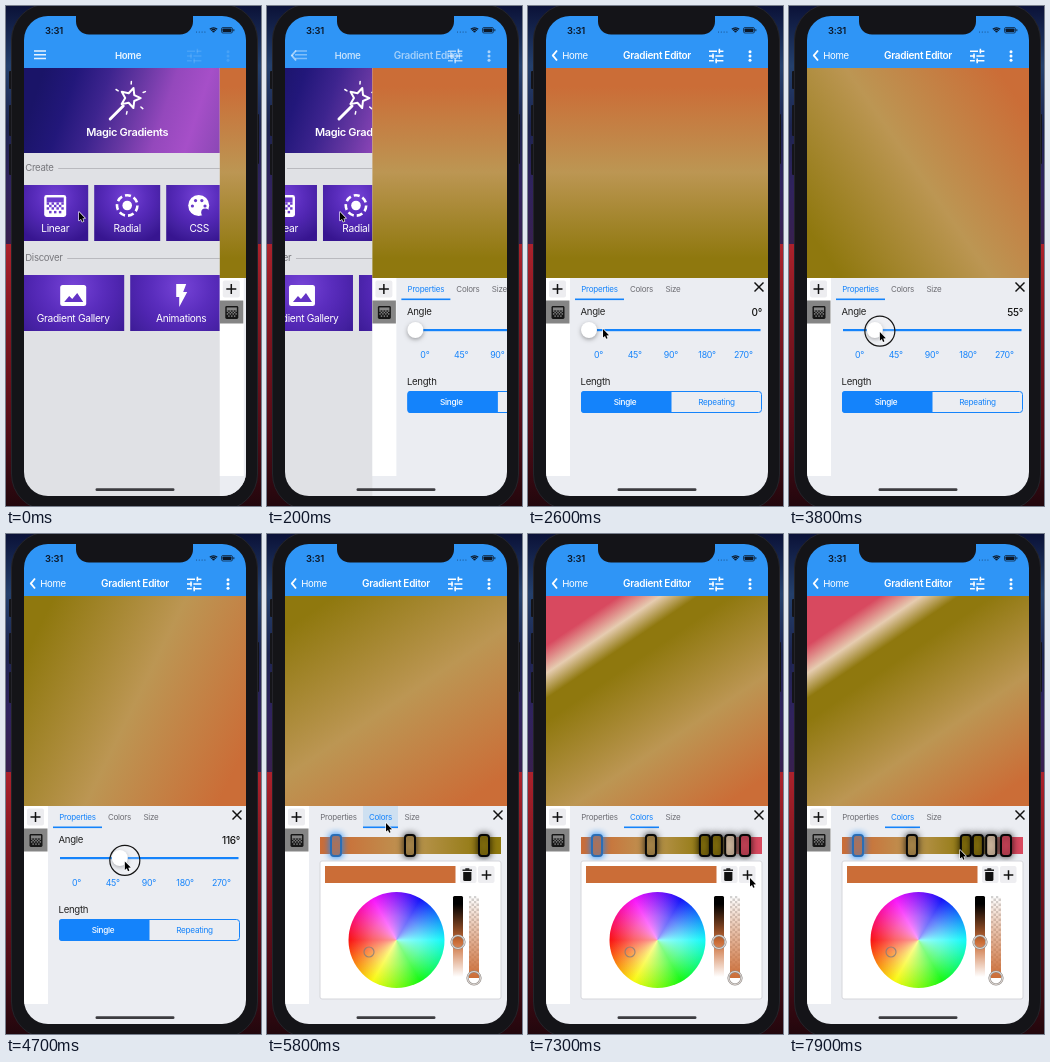
Recreate the animation shown at these times as an HTML page with a canvas. Size 255 by 500 pixels, loop 8 s.

```html
<!DOCTYPE html>
<html lang="en">
<head>
<meta charset="utf-8">
<title>Gradient editor</title>
<style>
html, body { margin: 0; width: 100%; height: 100%; overflow: hidden; background: #000; }
canvas { display: block; width: 255px; height: 500px; }
</style>
</head>
<body>
<canvas id="stage"></canvas>
<script>
const LOOP = 8000, STEP = 100;
const W = 255, H = 500;
const LEFT = 18, SCREEN_W = 222, TRACK = 53, TRACK_W = 181;
const BLUE = '#1483fb', BAR = '#2f95f6', INK = '#111', CASE = '#141418';
const ORANGE = '#cb6d37', TAN = '#bc9653', OLIVE = '#8f780e', PALE = '#e6ccb0', PINK = '#d8495f';
const DRAG = [3000, 5140], TAB_AT = 5700, FIRST_ADD = 6800, ADD_GAP = 200;

const canvas = document.getElementById('stage');
const c = canvas.getContext('2d');
const dpr = window.devicePixelRatio || 1;
canvas.width = W * dpr;
canvas.height = H * dpr;

const clamp = (v, a = 0, b = 1) => Math.min(b, Math.max(a, v));
const smooth = u => u * u * (3 - 2 * u);
const steady = u => u;
const mix = (a, b, u) => a + (b - a) * u;
const times = (n, f) => Array.from({ length: n }, (_, i) => f(i));

// pointer moves: start, end, x, y, easing
const moves = [
  [300, 900, 83, 321, smooth],
  [1500, 2300, 75, 323, smooth],
  [2600, 2900, 66, 325, smooth],
  [...DRAG, 132.5, 328, steady],
  [5250, 5600, 119, 289, smooth],
  [5900, 6500, 222, 344, smooth],
  [7300, 7800, 171, 316, smooth]
];

function pointer(t) {
  let x = 73, y = 206;
  for (const [from, to, tx, ty, ease] of moves) {
    const u = ease(clamp((t - from) / (to - from)));
    x = mix(x, tx, u);
    y = mix(y, ty, u);
  }
  return [x, y];
}

const added = t => clamp(Math.floor((t - FIRST_ADD) / ADD_GAP) + 1, 0, 3);

function pressed(t) {
  const click = at => t >= at - 100 && t < at + 50;
  return (t >= DRAG[0] - 100 && t < DRAG[1]) || click(TAB_AT - 50)
    || [0, 1, 2].some(i => click(FIRST_ADD + i * ADD_GAP - 50));
}

function paint(fill, stroke, width = 1) {
  if (fill) { c.fillStyle = fill; c.fill(); }
  if (stroke) { c.strokeStyle = stroke; c.lineWidth = width; c.stroke(); }
}

function rect(x, y, w, h, fill) {
  c.fillStyle = fill;
  c.fillRect(x, y, w, h);
}

function round(x, y, w, h, r, ...style) {
  c.beginPath();
  c.roundRect(x, y, w, h, r);
  paint(...style);
}

function disc(x, y, r, ...style) {
  c.beginPath();
  c.arc(x, y, r, 0, Math.PI * 2);
  paint(...style);
}

function poly(points, ...style) {
  c.beginPath();
  points.forEach(p => c.lineTo(...p));
  c.closePath();
  paint(...style);
}

function line(x0, y0, x1, y1, color, width) {
  c.beginPath();
  c.moveTo(x0, y0);
  c.lineTo(x1, y1);
  paint(null, color, width);
}

function shadowed(color, blur, dy, draw) {
  c.save();
  c.shadowColor = color;
  c.shadowBlur = blur * dpr;
  c.shadowOffsetY = dy * dpr;
  draw();
  c.restore();
}

function text(s, x, y, size, color, align = 'left', weight = 400) {
  c.font = `${weight} ${size}px Inter, "Liberation Sans", sans-serif`;
  c.letterSpacing = `${-0.03 * size}px`;
  c.textAlign = align;
  c.fillStyle = color;
  c.fillText(s, x, y + size * 0.36);
}

function blend(g, stops) {
  stops.forEach(([o, col]) => g.addColorStop(clamp(o), col));
  return g;
}
const even = (...cols) => cols.map((col, i) => [i / (cols.length - 1), col]);
const linear = (x0, y0, x1, y1, stops) => blend(c.createLinearGradient(x0, y0, x1, y1), stops);
const radial = (x, y, r, stops) => blend(c.createRadialGradient(x, y, 0, x, y, r), stops);

function plus(x, y, r) {
  line(x - r, y, x + r, y, INK, 1.5);
  line(x, y - r, x, y + r, INK, 1.5);
}

// Colour stops as [position, colour]; each addition squeezes the earlier ones.
function stopsFor(count) {
  let list = even(ORANGE, TAN, OLIVE);
  for (const col of [OLIVE, PALE, PINK].slice(0, count))
    list = [...list.map(([p, k]) => [p * 0.9, k]), [1, col]];
  return list;
}
const thumbX = p => 69 + 148 * p;
const onTrack = (stops, scale = 1) => stops.map(([p, col]) => [(thumbX(p) - TRACK) / TRACK_W * scale, col]);

function backdrop() {
  rect(0, 0, W, H, linear(0, 0, 0, 240, even('#0b1238', '#24406c', '#1d2550', '#30235e', '#38204e')));
  rect(0, 238, W, H, linear(0, 238, 0, H, even('#ac222c', '#8a1822', '#6c111c', '#4c0b16', '#22070d')));
  for (const y of [65, 99, 138]) round(3, y, 4, y < 90 ? 18 : 31, 1, CASE);
  round(249, 108, 4, 50, 1, CASE);
  round(5.5, -2, 246, 506, 36, CASE, '#24242a');
}

// Framed square whose lower half breaks into a checker.
function ditherIcon(x, y, s, fg, bg) {
  const n = s / 9;
  round(x, y, s, s, n, fg);
  rect(x + n, y + n, 7 * n, 2 * n, bg);
  for (let r = 2; r < 5; r++)
    for (let k = r % 2; k < 7; k += 2) rect(x + (k + 1) * n, y + (r + 1) * n, n, n, bg);
  for (let k = 2; k < 8; k += 2) rect(x + k * n, y + 6.5 * n, n, n, bg);
}

function card(x, y, w, label) {
  const cx = x + w / 2;
  rect(x, y, w, 56, radial(cx, y + 12, w * 0.72, even('#7644d6', '#6838ca', '#5a2dbd', '#4f25b0', '#43209f', '#371590')));
  text(label, cx, y + 43.5, 10.2, '#fff', 'center');
}

function wand(x, y) {
  const at = (r, a) => [x + r * Math.cos(a), y + r * Math.sin(a)];
  c.save();
  c.lineCap = c.lineJoin = 'round';
  poly(times(10, i => at(i % 2 ? 5 : 10.5, i * Math.PI / 5 - 1.25)), null, '#fff', 2);
  line(x - 7, y + 8, x - 20, y + 21, '#fff', 3);
  times(5, i => line(...at(14, i * 1.1 - 2.6), ...at(16.5, i * 1.1 - 2.6), '#fff', 1.5));
  c.restore();
}

function heading(s, y, lineX) {
  text(s, 27, y, 9.6, '#77777c');
  rect(lineX, y, 234 - lineX, 1, '#b9b9be');
}

function home(shift) {
  c.save();
  c.translate(-shift, 0);
  rect(0, 62, 260, 440, '#e0e1e5');
  rect(18, 62, 240, 85, linear(40, 80, 222, 140,
    even('#1a1468', '#22177a', '#3d248e', '#6637a2', '#9448bc', '#a64fc8', '#8c48b6')));
  wand(132, 92);
  text('Magic Gradients', 129, 126.5, 11, '#fff', 'center', 600);
  heading('Create', 162, 60);
  heading('Discover', 252, 69);
  ['Linear', 'Radial', 'CSS'].forEach((s, i) => card(24 + 72 * i, 179, 66, s));
  ['Gradient Gallery', 'Animations'].forEach((s, i) => card(24 + 108 * i, 269, 102, s));

  ditherIcon(46, 189, 22, '#fff', '#6c3bcd');
  c.setLineDash([6, 3.1]);
  disc(129, 199.5, 10.2, null, '#fff', 2.6);
  c.setLineDash([]);
  disc(129, 199.5, 4.8, '#fff');
  disc(200.5, 199.5, 10.5, '#fff');
  disc(207, 206.5, 4, '#5a2dbd');
  times(4, i => disc(200.5 - 6.3 * Math.cos(i * Math.PI / 3), 200 - 6.3 * Math.sin(i * Math.PI / 3), 1.6, '#6838ca'));
  round(62, 279, 26, 21, 2.5, '#fff');
  poly([[66, 296], [71, 290], [74, 293], [79, 287], [85, 296]], '#6434c6');
  poly([[178, 278], [188, 278], [185, 286], [189, 286], [181, 301], [181, 291], [178, 291]], '#fff');
  c.restore();
}

function preview(count, angle) {
  const a = angle * Math.PI / 180, sx = -Math.sin(a), sy = Math.cos(a);
  const half = (SCREEN_W * Math.abs(sx) + 210 * Math.abs(sy)) / 2, cx = 129, cy = 167;
  const stops = onTrack(stopsFor(count), 1 - 0.016 * count);
  rect(LEFT, 62, SCREEN_W, 210, linear(cx - sx * half, cy - sy * half, cx + sx * half, cy + sy * half, stops));
}

function tabs(active, t) {
  const [x, w] = active ? [96, 35] : [47, 49];
  if (active) rect(x, 272, w, 21, `rgba(120,185,235,${0.25 * clamp(1 - (t - 5800) / 400)})`);
  ['Properties', 'Colors', 'Size'].forEach((s, i) =>
    text(s, [71.5, 113.5, 145][i], 283, 8, i === active ? BLUE : '#6d6d73', 'center'));
  rect(x, 292.5, w, 1.6, BLUE);
  for (const d of [-4.5, 4.5]) line(231 - d, 276.5, 231 + d, 285.5, INK, 1.5);
}

function properties(angle, x) {
  text('Angle', 52.5, 306, 9.6, '#222');
  text(angle + '°', 234, 306, 10, INK, 'right', 500);
  rect(54, 323, 178.5, 2.2, BLUE);
  shadowed('rgba(0,0,0,.35)', 4, 1.5, () => disc(x, 324, 8, '#fff'));
  [0, 45, 90, 180, 270].forEach((v, i) => text(v + '°', 70.5 + 36.2 * i, 349, 8.8, BLUE, 'center'));
  text('Length', 52.5, 375.5, 9.6, '#222');
  round(TRACK, 385, 90.5, 22, [3, 0, 0, 3], BLUE);
  round(TRACK + 0.5, 385.5, TRACK_W - 1, 21, 3, null, BLUE);
  text('Single', 97, 396, 8.2, '#fff', 'center', 500);
  text('Repeating', 188.5, 396, 8.2, BLUE, 'center');
}

function wheel(x, y, r) {
  const hues = c.createConicGradient(Math.PI, x, y);
  disc(x, y, r, blend(hues, even(...times(7, i => `hsl(${360 - i * 60},95%,52%)`))));
  disc(x, y, r, radial(x, y, r, even('rgba(255,255,255,.6)', 'rgba(255,255,255,.35)', 'rgba(255,255,255,0)')));
  disc(102, 418, 5, null, 'rgba(130,125,125,.8)', 1.2);
}

function knob(x, y) {
  disc(x, y, 6.5, null, '#8c8784', 2.2);
  disc(x, y, 6.5, null, '#ddd6d2', 1.1);
}

function colors(stops) {
  rect(TRACK, 303, TRACK_W, 17, linear(TRACK, 0, TRACK + TRACK_W, 0, onTrack(stops)));
  stops.forEach(([p, col], i) => {
    const x = thumbX(p);
    shadowed(i ? 'rgba(0,0,0,.75)' : '#1689ff', 7, 0,
      () => round(x - 5, 301, 10, 21, 3, col, i ? '#080808' : '#2b6db4', 2));
  });
  round(TRACK, 327, TRACK_W, 138, 2, '#fff', '#d5d6db');
  rect(58, 332, 130.5, 17, ORANGE);
  for (const x of [193, 211]) round(x, 332, 16.5, 17, 2, '#eeeef1');
  rect(195.5, 335.5, 9.5, 1.4, INK);
  rect(198.3, 334.3, 4, 1.5, INK);
  round(196.2, 338, 8.2, 9, [0, 0, 1.5, 1.5], INK);
  plus(219.5, 341, 4.8);
  wheel(129.5, 406, 48);
  round(186, 362, 10, 81, 1.5, linear(0, 362, 0, 443, [[0.1, '#000'], [0.57, ORANGE], [1, '#fff']]));
  for (let i = 0; i < 128; i++) {
    const x = i % 4, y = i >> 2;
    rect(202 + x * 2.5, 362 + y * 2.5, 2.5, 2.5, (x + y) % 2 ? '#fff' : '#d2d2d2');
  }
  rect(202, 362, 10, 82, linear(0, 362, 0, 444, even('rgba(203,109,55,0)', ORANGE)));
  knob(191, 408);
  knob(207, 444);
}

function editor(t, offset) {
  const count = added(t);
  const drag = pointer(clamp(t, ...DRAG))[0] - 5;
  const angle = Math.round((drag - 61) / 164 * 360);
  const tab = t >= TAB_AT ? 1 : 0;
  c.save();
  c.translate(offset, 0);
  rect(LEFT, 62, SCREEN_W, 430, '#ebedf2');
  preview(count, angle);
  rect(18, 272, 24, 198, '#fff');
  round(21, 274.5, 17, 17, 2, '#ededf0');
  plus(29.5, 283, 5);
  rect(18, 294.5, 23.5, 23, '#858585');
  ditherIcon(23.5, 300, 13, '#161616', '#858585');
  tabs(tab, t);
  if (tab) colors(stopsFor(count));
  else properties(angle, drag);
  c.restore();
}

function statusBar() {
  const ink = '#0c1828';
  text('3:31', 48, 24.5, 9.4, ink, 'center', 600);
  times(4, i => disc(190.5 + i * 2.8, 26, 0.6, 'rgba(10,30,60,.65)'));
  for (const r of [5.2, 3.3, 1.4]) {
    c.beginPath();
    c.arc(207.5, 27, r, -2.35, -0.79);
    paint(null, ink, 1.3);
  }
  round(215.5, 21.5, 11, 5.5, 1.5, null, ink, 0.7);
  round(216.5, 22.4, 9, 3.7, 0.8, ink);
  rect(227.4, 23.2, 0.9, 2, ink);
}

// Three slider rows: a gap and a tick in each.
function tuneIcon(x, y) {
  [[10, 13], [6, 5], [6, 9]].forEach(([gap, tick], i) => {
    const s = 0.8, ly = y + (i - 1) * 6 * s;
    line(x, ly, x + gap * s, ly, '#fff', 1.5);
    line(x + (gap + 2) * s, ly, x + 18 * s, ly, '#fff', 1.5);
    line(x + tick * s, ly - 2.4, x + tick * s, ly + 2.4, '#fff', 1.5);
  });
}

function header(p) {
  const slide = clamp((p - 0.12) / 0.88), homeX = mix(122, 47, slide);
  rect(LEFT, 8, SCREEN_W, 54, BAR);
  statusBar();
  c.globalAlpha = 1 - p;
  times(3, i => line(28, 45 + i * 3.7, 40, 45 + i * 3.7, '#fff', 1.5));
  text('Home', homeX, 49.5, 9.6, '#fff', 'center', 600);
  c.globalAlpha = p;
  text('Home', homeX, 49.5, 9.6, '#fff', 'center');
  tuneIcon(181, 50);
  times(3, i => disc(222, 45.8 + i * 4.2, 1.5, '#fff'));
  c.globalAlpha = slide;
  line(29, 44.5, 24.5, 49.8, '#fff', 1.8);
  line(24.5, 49.2, 29, 54.5, '#fff', 1.8);
  text('Gradient Editor', mix(200, 129, slide), 49.5, 10, '#fff', 'center', 600);
  c.globalAlpha = 1;
}

function arrow(t) {
  const [x, y] = pointer(t);
  if (pressed(t)) disc(x, y - 1, 15, 'rgba(255,255,255,.2)', '#151515', 1.2);
  c.save();
  c.translate(x, y);
  c.lineJoin = 'round';
  const shape = [[0, 0], [0, 8.6], [2, 6.9], [3.2, 9.8], [4.6, 9.2], [3.4, 6.4], [6, 6.2]];
  poly(shape, null, '#fff', 1.2);
  poly(shape, '#000');
  c.restore();
}

function draw(t) {
  const p = smooth(clamp((t + 120) / 560));
  c.setTransform(dpr, 0, 0, dpr, 0, 0);
  backdrop();
  c.save();
  c.beginPath();
  c.roundRect(LEFT, 10, SCREEN_W, 480, 24);
  c.clip();
  if (p < 1) home(66 * p);
  editor(t, SCREEN_W * (1 - p));
  header(p);
  round(89.5, 482.3, 79, 2.8, 1.4, '#3c3c40');
  c.restore();
  round(70, 4, 117, 24.5, [0, 0, 13, 13], CASE);
  arrow(t);
}

const start = performance.now();
function frame() {
  const t = (performance.now() - start) % LOOP;
  draw(Math.floor(t / STEP) * STEP);
  requestAnimationFrame(frame);
}
frame();
</script>
</body>
</html>
```
